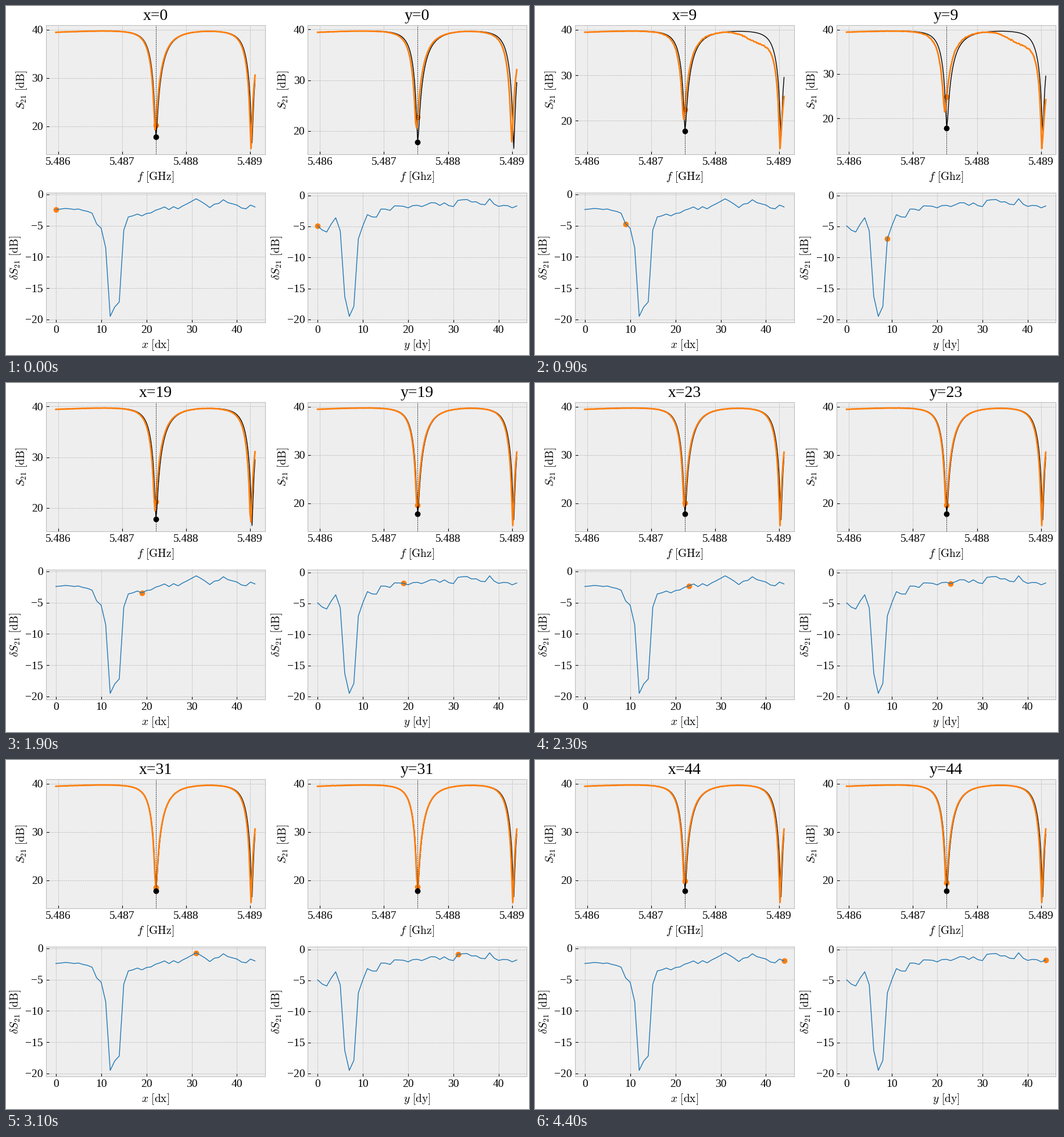
A matplotlib script that plays this animation: 900 px wide and 600 px high, repeating every 4.5 s.

```python
import numpy as np
import matplotlib.pyplot as plt
from matplotlib.animation import FuncAnimation
from matplotlib.ticker import FormatStrFormatter, MultipleLocator

plt.rcParams.update({
    "font.family": "Liberation Serif", "font.size": 14, "mathtext.fontset": "cm",
    "axes.titlesize": 20, "axes.labelsize": 14,
    "axes.facecolor": "#eeeeee", "axes.edgecolor": "#bcbcbc", "axes.axisbelow": True,
    "axes.grid": True, "grid.color": "#b2b2b2", "grid.linestyle": "--", "grid.linewidth": 0.5,
    "xtick.direction": "in", "ytick.direction": "in",
})

W, H, DPI, STEPS = 900, 600, 100, 45
ORANGE, BLUE = "#ff7f0e", "#1f77b4"

# Frequency axis: u is the offset from 5.486 GHz in MHz
u = np.linspace(-0.0385, 3.0765, 200)
freq = 5.486 + u / 1000
t = np.linspace(0, 1, u.size)
base = 39.5 + 1.91 * t - 1.2 * t**2
DIP = 100
U1, U2 = u[DIP], u[196]
FLOOR = 17.8


def shift_curve(keys, seed):
    """Change of the dip level in dB: key points with jitter on the steps between."""
    steps = np.arange(STEPS)
    at, value = zip(*keys)
    jitter = np.random.default_rng(seed).normal(0, 0.2, STEPS)
    jitter[list(at)] = 0
    return np.interp(steps, at, value) + jitter


def ratio(loss):
    return 10 ** (loss / 10) - 1


def notch(center, left, right, loss):
    """Loss in dB of a lopsided Lorentzian dip."""
    w2 = np.where(u < center, left, right) ** 2
    return 10 * np.log10(1 + w2 / ((u - center) ** 2 + w2 / ratio(loss)))


def level(center):
    return np.interp(center, u, base)


def mix(a, b, m):
    return a + (b - a) * m


reference = (base - notch(U1, 0.159, 0.245, base[DIP] - FLOOR)
             - notch(U2, 0.164, 0.155, level(U2) - 16.65))


def response(k, d, crossing, seed):
    near = np.exp(-((k - crossing) / 5) ** 4)
    wide = np.clip((d - 7) / 10, 0, 1)
    sag = near * np.clip((d - 2) / 2.5, 0, 1)
    lag = (1 - near) * np.clip((d - 2.5) / 2.4, 0, 1)

    # First dip: moved left until it meets the wanted level at U1
    right = 0.245
    depth = base[DIP] - (18 + 0.4 * d + 0.016 * d**2)
    x2 = right**2 * (1 / ratio(base[DIP] - FLOOR - d) - 1 / ratio(depth))
    first = notch(U1 - np.sqrt(max(x2, 0)), 0.159 * (1 + 0.65 * (d / 20) ** 2), right, depth)

    # Second dip: sharp, and broad near the crossing
    c2 = mix(u[195] - 0.0157 * lag, u[195] - 0.346, wide)
    low = mix(15.5 + 2.6 * lag - 1.3 * sag, 33, wide)
    second = notch(c2, mix(0.164, 0.318, wide), mix(0.179 + 0.2 * sag, 0.345, wide),
                   level(c2) - low)
    shoulder = 2.6 * sag * (1 - wide) * np.exp(-((u - 2.705) / 0.309) ** 2)

    loss = first + second + shoulder
    rng = np.random.default_rng(seed + k)
    noise = 0.012 + (0.17 * wide + 0.07 * sag) * np.clip(loss / 2, 0, 1)
    return base - loss + noise * rng.standard_normal(u.size)


def place(fig, left, top):
    return fig.add_axes([left / W, 1 - (top + 222.3) / H, 377 / W, 222.3 / H])


def dot(ax, x, y, color):
    return ax.scatter([x], [y], s=36, color=color, linewidths=1)


def fit(ax, values):
    lo, hi = values.min(), values.max()
    pad = 0.05 * (hi - lo)
    ax.set_ylim(lo - pad, hi + pad)


class Column:
    def __init__(self, fig, left, name, unit, keys, crossing, seed):
        self.name, self.crossing, self.seed = name, crossing, seed
        self.shift = shift_curve(keys, seed)

        self.top = top = place(fig, left, 32.8)
        self.mark = dot(top, freq[DIP], FLOOR, ORANGE)
        dot(top, freq[DIP], FLOOR, "black")
        top.plot(freq, reference, color="black", lw=1)
        self.line, = top.plot(freq, reference, color=ORANGE, lw=2)
        top.axvline(freq[DIP], color="black", ls="--", lw=0.5)
        span = freq[-1] - freq[0]
        top.set_xlim(freq[0] - 0.05 * span, freq[-1] + 0.05 * span)
        top.xaxis.set_major_locator(MultipleLocator(0.001))
        top.xaxis.set_major_formatter(FormatStrFormatter("%.3f"))
        top.yaxis.set_major_locator(MultipleLocator(10))
        top.set_xlabel(rf"$f\ \mathrm{{[{unit}]}}$")
        top.set_ylabel(r"$S_{21}\ \mathrm{[dB]}$")

        low = place(fig, left, 321.4)
        self.step = dot(low, 0, self.shift[0], ORANGE)
        low.plot(np.arange(STEPS), self.shift, color=BLUE, lw=1)
        low.set_xlim(-2.2, 46.2)
        fit(low, self.shift)
        low.xaxis.set_major_locator(MultipleLocator(10))
        low.yaxis.set_major_locator(MultipleLocator(5))
        low.set_xlabel(rf"${name}\ \mathrm{{[d{name}]}}$")
        low.set_ylabel(r"$\delta S_{21}\ \mathrm{[dB]}$")

    def update(self, k):
        d = -self.shift[k]
        curve = response(k, d, self.crossing, self.seed)
        self.line.set_ydata(curve)
        self.mark.set_offsets([[freq[DIP], FLOOR + d]])
        self.step.set_offsets([[k, -d]])
        fit(self.top, np.concatenate([reference, curve]))
        self.top.set_title(f"{self.name}={k}")


KEYS_X = [(0, -2.4), (4, -2.4), (8, -3), (9, -4.7), (10, -5.4), (11, -8.5), (12, -19.5),
          (14, -17.2), (15, -5.7), (16, -3.6), (23, -2.3), (27, -2.3), (31, -0.7),
          (34, -2.1), (37, -0.85), (39, -1.5), (42, -2.3), (44, -2)]
KEYS_Y = [(0, -4.9), (2, -5.9), (4, -3.6), (5, -5.7), (6, -16.3), (7, -19.5), (8, -17.9),
          (9, -7), (11, -3.1), (13, -3.5), (14, -2.2), (18, -1.7), (23, -1.8), (26, -1.2),
          (30, -1.8), (31, -0.8), (37, -1.5), (38, -0.55), (39, -1.4), (43, -2), (44, -1.7)]

fig = plt.figure(figsize=(W / DPI, H / DPI), dpi=DPI, facecolor="white")
columns = [Column(fig, 68.7, "x", "GHz", KEYS_X, 12.3, 100),
           Column(fig, 519.1, "y", "Ghz", KEYS_Y, 7, 500)]


def draw(k):
    for column in columns:
        column.update(k)
    return []


anim = FuncAnimation(fig, draw, frames=STEPS, init_func=lambda: draw(0),
                     interval=100, repeat=True, repeat_delay=0)
plt.show()
```
